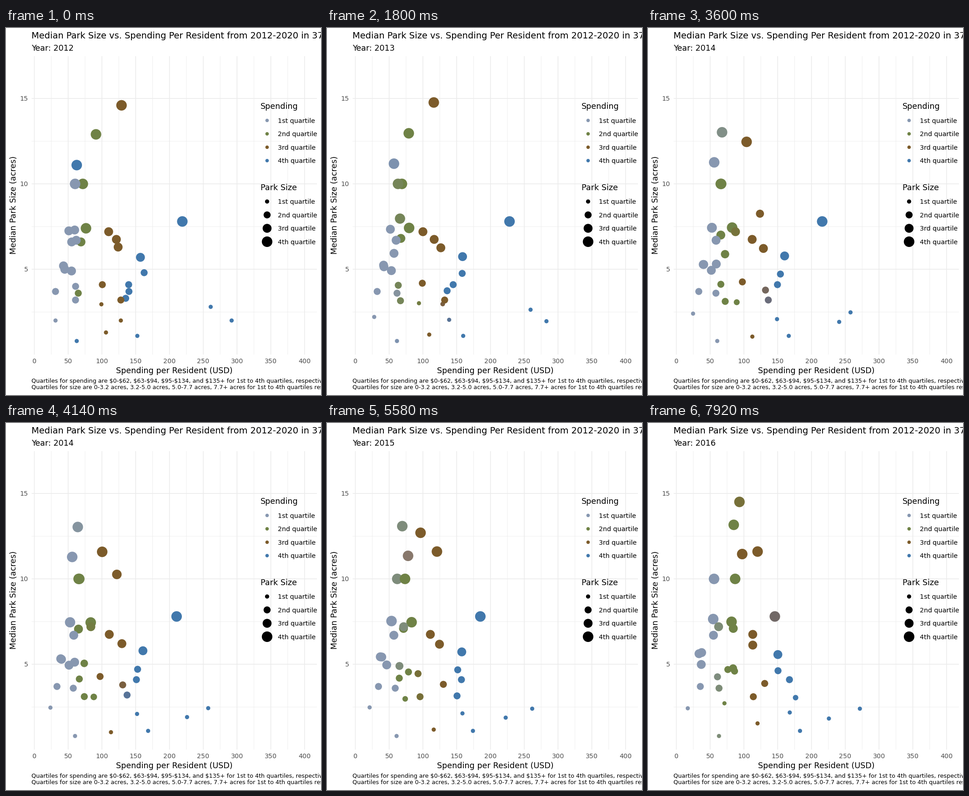
Recreate the animation shown at these times as a matplotlib script. Size 693 by 808 pixels, loop 8 s.

```python
import numpy as np
import matplotlib.pyplot as plt
from matplotlib.animation import FuncAnimation
from matplotlib.colors import to_rgb

plt.rcParams["font.family"] = "DejaVu Sans"
W, H, DPI = 693, 808, 64
PT = 72 / DPI                        # points per pixel
INTERVAL, STEP_MS, LOOP_MS = 40, 180, 8000
YEARS = 5                            # 2012 to 2016
STEPS_PER_YEAR = 99 / 8
KEY_STEPS = np.round(np.arange(YEARS) * STEPS_PER_YEAR)
PALETTE = ["#8797B0", "#6F8246", "#7C5B2A", "#4178AC"]
DIAMETERS = np.array([9.2, 15.4, 19.6, 23.2])
QUARTILES = ["1st quartile", "2nd quartile", "3rd quartile", "4th quartile"]


def yearly(keys):
    """Spread a few key values evenly over the years."""
    keys = np.atleast_1d(keys)
    return np.interp(np.linspace(0, 1, YEARS), np.linspace(0, 1, len(keys)), keys)


spend_paths, acre_paths = [], []


def city(spend, acres):
    spend_paths.append(yearly(spend))
    acre_paths.append(yearly(acres))


# Large parks
city([129, 98, 92], [14.6, 14.8, 11, 14.4, 14.6])
city([91.2, 62, 91.8], [12.9, 13.2])
city([62.7, 56, 56, 100, 95.3], [11.1, 11.5])
city([71.7, 65, 53], 10)
city([60.3, 67, 93], 10)
city([51, 55], [7.25, 7.7])
city([59.7, 75, 89.5], [7.3, 8.1, 4.5, 4.6, 4.6])
city([76.4, 84, 81], [7.4, 7.5])
city([219, 230, 207, 163, 131], 7.8)

# Medium parks
city([69, 65, 90], [6.6, 7.1, 7.1])
city([55.2, 60, 81], [6.6, 5, 4.6])
city([62, 54], 6.7)
city([110, 98, 81, 62, 63], 7.2)
city([121.4, 110, 114], 6.75)
city([124, 130, 108], [6.3, 6.1])
city([43.1, 36.7], [5.2, 5.3, 5.8])
city([45, 32], [5, 5.7])
city([55, 51, 32.6], [4.9, 5])
city([157, 161, 147], [5.7, 5.8, 5.5])

# Small parks
city([61, 67, 59], [4, 4.3])
city([31.3, 36], 3.7)
city([65, 57, 65], 3.6)
city([60.9, 75, 70], [3.2, 3.1, 2.6])
city([100.6, 97, 80], [4.1, 4.3, 4.9])
city([99.2, 87, 122], [2.95, 3.1, 3.1])
city([135.2, 121, 120], [3.3, 2.9, 11.6, 11.6, 11.6])
city([128, 138, 188], [3.2, 3.2, 3])
city([140, 130, 131], [3.7, 3.9])
city([139.6, 152, 172], 4.1)
city([162.5, 152, 150], [4.8, 4.6])

# Pocket parks
city([31.3, 15], [2, 2.5, 2.4])
city([62.7, 60, 64], 0.8)
city([128, 154, 172], [2, 2.2])
city([106, 122], [1.3, 1, 1.7])
city([152.4, 187], 1.1)
city([261, 257, 276], [2.8, 2.4, 2.4])
city([292, 281, 216, 229, 223], [2, 1.8])

spend, acres = np.array(spend_paths), np.array(acre_paths)

# Colours blend in CIE Lab
RGB_TO_XYZ = np.array([[0.4124, 0.3576, 0.1805],
                       [0.2126, 0.7152, 0.0722],
                       [0.0193, 0.1192, 0.9505]])
WHITE = RGB_TO_XYZ.sum(axis=1)
XYZ_TO_LAB = np.array([[0, 116, 0], [500, -500, 0], [0, 200, -200]])


def rgb_to_lab(rgb):
    linear = ((np.asarray(rgb) + 0.055) / 1.055) ** 2.4
    return np.cbrt(linear @ RGB_TO_XYZ.T / WHITE) @ XYZ_TO_LAB.T


def lab_to_rgb(lab):
    xyz = (lab @ np.linalg.inv(XYZ_TO_LAB).T) ** 3 * WHITE
    linear = np.clip(xyz @ np.linalg.inv(RGB_TO_XYZ).T, 0, 1)
    return np.clip(1.055 * linear ** (1 / 2.4) - 0.055, 0, 1)


# Values falling between two bands (62-63, 94-95) count as 4th quartile
spend_rank = np.select(
    [spend <= 62, (spend >= 63) & (spend <= 94), (spend >= 95) & (spend <= 134)],
    [0, 1, 2], 3)
lab = rgb_to_lab([to_rgb(c) for c in PALETTE])[spend_rank]
diameter = DIAMETERS[np.digitize(acres, [3.05, 4.85, 7.4])]


def px(value):
    return 62.4 + 1.4863 * value


def py(value):
    return 719.2 - 37.6 * value


fig = plt.figure(figsize=(W / DPI, H / DPI), dpi=DPI, facecolor="white")
ax = fig.add_axes([0, 0, 1, 1])
ax.set(xlim=(0, W), ylim=(H, 0))
ax.axis("off")


def label(x, y, text, size, **kw):
    return ax.text(x, y, text, fontsize=size * PT, va="baseline",
                   rotation_mode="anchor", parse_math=False, **kw)


def dots(x, y, size, color):
    return ax.scatter(x, y, s=(np.asarray(size) * PT) ** 2, c=color,
                      linewidths=0, zorder=3)


def grid(xs, ys, width):
    style = dict(colors="#EBEBEB", linewidths=width * PT, zorder=1, snap=False)
    ax.vlines(px(xs), 62, 719, **style)
    ax.hlines(py(ys), 56.5, 684, **style)


grid(np.arange(25, 400, 50), np.array([2.5, 7.5, 12.5]), 0.8)
grid(np.arange(0, 401, 50), np.array([5, 10, 15]), 1.6)
for v in range(0, 401, 50):
    label(px(v), 738, str(v), 14.3, color="#4D4D4D", ha="center")
for v in (5, 10, 15):
    label(49, py(v) + 5.2, str(v), 14.3, color="#4D4D4D", ha="right")

label(56.5, 23, "Median Park Size vs. Spending Per Resident from 2012-2020 in 37", 19.4)
subtitle = label(56.5, 50, "", 17.5)
label(370, 759.5, "Spending per Resident (USD)", 17.5, ha="center")
label(22, 390, "Median Park Size (acres)", 17.5, rotation=90, ha="center")
label(56.5, 781, "Quartiles for spending are $0-$62, $63-$94, $95-$134, and $135+ "
      "for 1st to 4th quartiles, respectively.", 12.75)
label(56.5, 795, "Quartiles for size are 0-3.2 acres, 3.2-5.0 acres, 5.0-7.7 acres, "
      "7.7+ acres for 1st to 4th quartiles respectively.", 12.8)


def legend(title, top, sizes, colors):
    label(560, top, title, 17.5)
    rows = top + 25 + 29.5 * np.arange(4)
    dots(np.full(4, 574.4), rows, sizes, colors)
    for y, text in zip(rows, QUARTILES):
        label(598, y + 5.2, text, 14.3)


legend("Spending", 178.5, np.full(4, 7.6), PALETTE)
legend("Park Size", 357, DIAMETERS, ["black"] * 4)
points = dots(px(spend[:, 0]), py(acres[:, 0]), diameter[:, 0], lab_to_rgb(lab[:, 0]))


def update(i):
    step = (i * INTERVAL + INTERVAL // 2) // STEP_MS
    k = np.searchsorted(KEY_STEPS, step, side="right") - 1
    t = (step - KEY_STEPS[k]) / (KEY_STEPS[k + 1] - KEY_STEPS[k])

    def tween(values):
        return values[:, k] * (1 - t) + values[:, k + 1] * t

    points.set_offsets(np.column_stack([px(tween(spend)), py(tween(acres))]))
    points.set_sizes((tween(diameter) * PT) ** 2)
    points.set_facecolors(lab_to_rgb(tween(lab)))
    subtitle.set_text(f"Year: {int(2012.5 + step / STEPS_PER_YEAR)}")
    return points, subtitle


anim = FuncAnimation(fig, update, frames=LOOP_MS // INTERVAL, interval=INTERVAL,
                     repeat=True, repeat_delay=0)
plt.show()
```
